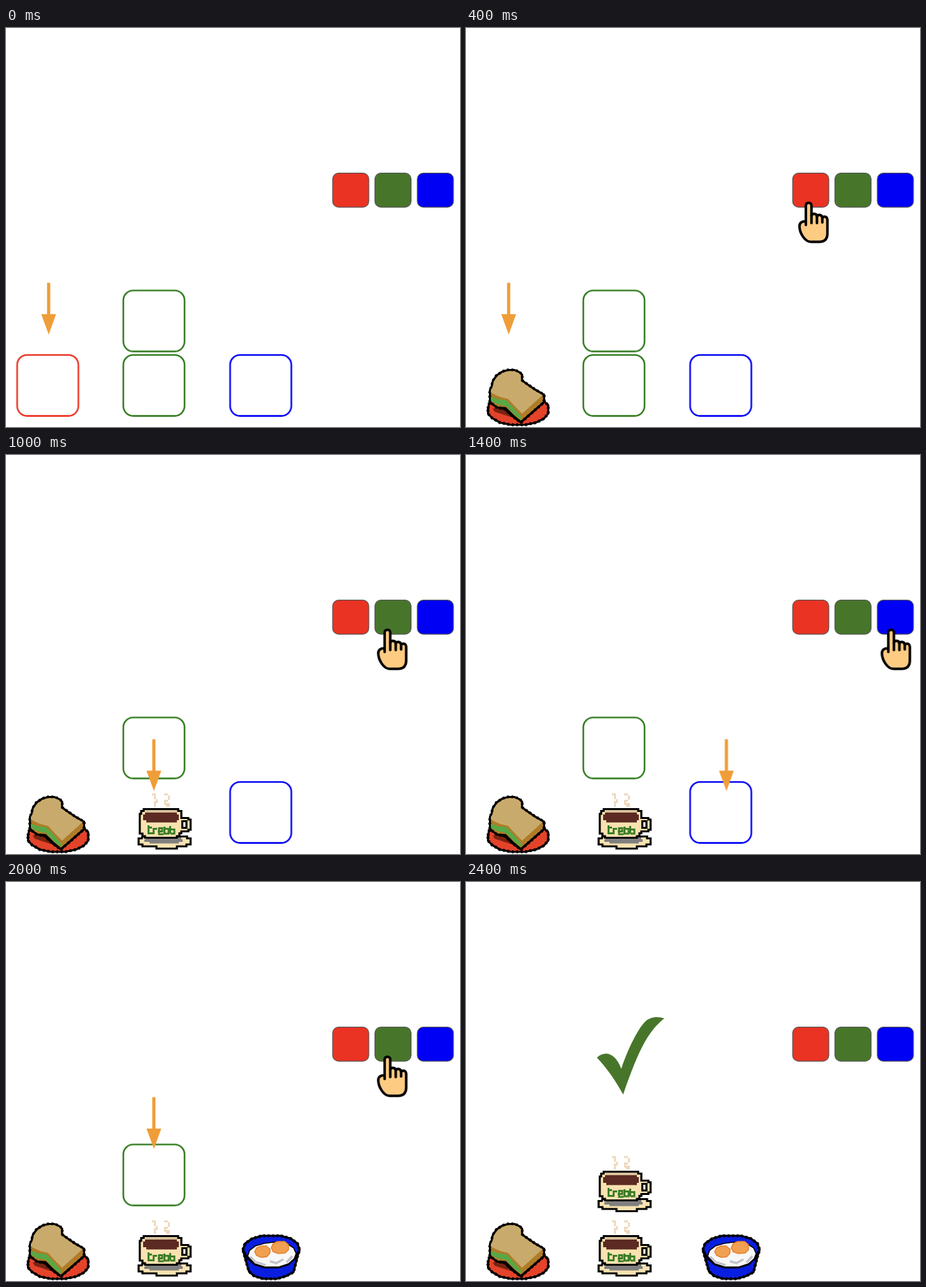
An HTML page for the animation above (2600 ms loop, 712 by 626 pixels).

```html
<!DOCTYPE html>
<html lang="en">
<head>
<meta charset="utf-8">
<title>Breakfast order</title>
<style>
  html, body { margin: 0; width: 100%; height: 100%; overflow: hidden; background: #fff; }
  svg { display: block; width: 100%; height: 100%; }

  .slot { fill: none; stroke-width: 2.6; }
  .red { stroke: #ea3323; }
  .green { stroke: #357d22; }
  .blue { stroke: #0000f5; }
  .key { stroke: #555; stroke-width: 1.2; }
  .ink { stroke: #000; stroke-width: 3.2; stroke-linejoin: miter; }
  .rough { fill: none; stroke: #000; stroke-width: 4.6; stroke-dasharray: 3 4; }

  /* 13 beats of 200 ms */
  .anim { animation: 2600ms step-end infinite; }
  .old { --a: 1; --b: 0; }
  .new { --a: 0; --b: 1; }
  .b2 { animation-name: beat2; }
  .b5 { animation-name: beat5; }
  .b8 { animation-name: beat8; }
  .b11 { animation-name: beat11; }
  .b12 { animation-name: beat12; }
  .arrow { animation-name: arrow; }
  .hand { animation-name: hand; }

  @keyframes beat2 { 0% { opacity: var(--a); } 15.384%, 100% { opacity: var(--b); } }
  @keyframes beat5 { 0% { opacity: var(--a); } 38.461%, 100% { opacity: var(--b); } }
  @keyframes beat8 { 0% { opacity: var(--a); } 61.538%, 100% { opacity: var(--b); } }
  @keyframes beat11 { 0% { opacity: var(--a); } 84.615%, 100% { opacity: var(--b); } }
  @keyframes beat12 { 0% { opacity: var(--a); } 92.307%, 100% { opacity: var(--b); } }

  @keyframes arrow {
    0% { transform: translate(0, 0); opacity: 1; }
    23.076% { transform: translate(165px, 46.2px); opacity: 1; }
    46.153% { transform: translate(341.5px, 46.2px); opacity: 1; }
    69.23% { transform: translate(165px, -62.2px); opacity: 1; }
    92.307%, 100% { transform: translate(165px, -62.2px); opacity: 0; }
  }
  @keyframes hand {
    0% { transform: translate(0, 0); opacity: 0; }
    7.692% { transform: translate(0, 0); opacity: 1; }
    23.076% { transform: translate(0, 0); opacity: 0; }
    30.769% { transform: translate(60.8px, 0); opacity: 1; }
    46.153% { transform: translate(60.8px, 0); opacity: 0; }
    53.846% { transform: translate(129.3px, 0); opacity: 1; }
    69.23% { transform: translate(129.3px, 0); opacity: 0; }
    76.923% { transform: translate(60.8px, 0); opacity: 1; }
    92.307%, 100% { transform: translate(60.8px, 0); opacity: 0; }
  }
</style>
</head>
<body>
<svg viewBox="0 0 712 626" preserveAspectRatio="none">
  <defs>
    <rect id="slot" width="96" height="95.6" rx="15.5"/>
    <rect id="key" y="227.6" width="56.8" height="53.6" rx="9.5"/>

    <g id="cup">
      <path fill="#ecd9bd" d="M229 531H235V540H238V546H235V552H232V543H235V540H232V534H229ZM248 531H254V534H257V541H254V544H251V546H257V552H251V549H248V541H254V534H248Z"/>
      <path class="ink" fill="#fae2b0" d="M213 601.5H208V611H214V614H236V617.5H268V614H283V611H289.5V601.5H284V598.5H214Z"/>
      <path fill="#808080" d="M219 600H275V603H277V607H271V609.5H225V607H217V603H219Z"/>
      <path class="ink" fill="#fae2b0" d="M216 555.5H270V558.5H275V569.5H286V572H289.5V588H286V590.5H275V593.5H272V598H268V600.5H218V598H214V594H209.8V563H212V558.5H216Z"/>
      <path fill="#d8c19a" d="M219 557H268V561H219Z"/>
      <path fill="#5c2a22" d="M218 561H268V564H271V573H268V576.5H220V573H215V564H218Z"/>
      <path class="ink" fill="#fff" stroke-width="3" d="M276.5 574.5H283V585H276.5Z"/>
      <path fill="none" stroke="#3c7d27" stroke-width="3" d="M223.5 581V595M222 584.5H229M223 593.5H233M231.5 595V586.5H237M238 590.5H245V585.5H240V595H247M248.5 583V594H255V586.5H249M257.5 582V594M259 587.5H264V594H258"/>
    </g>

    <path id="plate" d="M34.5 597L36 590L43 583L56 577H108L121 584L129 592V605L122 613L110 619L93 622.5H70L53 619L41 612L34.5 605Z"/>
    <path id="bread" d="M37.5 587V568L40 563L42 554L48 545L57 539L66 536.5L76 536.5L84 540L88 544V553L95 558L108 567L122.5 575.5V587L86 619L74 610L61 598L48 595Z"/>
    <path id="bowl" d="M371.5 577L375 567L386 559.5L401 555H431L447 559.5L457 567L460.5 577L457 588L451 612L440 618L425 622.5H403L389 618L381 611L375 590Z"/>
  </defs>

  <g class="key">
    <use href="#key" x="512.2" fill="#ea3323"/>
    <use href="#key" x="578.5" fill="#47762b"/>
    <use href="#key" x="645" fill="#0000f5"/>
  </g>

  <use href="#slot" x="17.5" y="513" class="slot red anim old b2"/>
  <use href="#slot" x="184" y="411.8" class="slot green anim old b11"/>
  <use href="#slot" x="184" y="513" class="slot green anim old b5"/>
  <use href="#slot" x="351.5" y="513" class="slot blue anim old b8"/>

  <g class="anim new b2">
    <use href="#plate" class="ink" fill="#e4432a"/>
    <use href="#plate" class="rough"/>
    <path fill="#7a2312" d="M42 597L53 595L64 600L76 612L60 607L45 602Z"/>
    <use href="#bread" class="ink" fill="#b07c28"/>
    <use href="#bread" class="rough"/>
    <path fill="#c8ab6c" d="M39 572V568L42 563L44 554L49 547L58 541L66 538.5H76L83 541.5L86 545V554L94 560L107 569L120 576L88 605L78 595L66 582L54 579L47 576Z"/>
    <path fill="#57a846" d="M39 578L48 582L63 584L75 596L86 609V615L76 607L63 593L49 590L39 585Z"/>
    <path fill="none" stroke="#000" stroke-width="2.6" d="M38 587L48 595L62 596L74 608L86 618L122 587"/>
  </g>

  <use href="#cup" class="anim new b5"/>
  <use href="#cup" y="-101" class="anim new b11"/>

  <g class="anim new b8">
    <use href="#bowl" class="ink" fill="#0a1ee0"/>
    <use href="#bowl" class="rough"/>
    <path fill="none" stroke="#000" stroke-width="2.6" d="M374 580L379 591L390 600L405 605H427L443 600L453 591L458 580"/>
    <path fill="#f8f8f8" stroke="#000" stroke-width="1.6" d="M379 587L382 578L391 571L405 567L420 565L440 567L451 574L455 583L452 591L443 599L428 604H406L390 599Z"/>
    <path fill="none" stroke="#c2c2ca" stroke-width="3.4" d="M383 588L391 596L407 601M414 595L424 598L435 592M440 597L449 587"/>
    <g fill="#f0a050" stroke="#e58030" stroke-width="1.6">
      <path d="M390 580L393 574L400 571H408L414 576V582L409 588L400 589L393 586Z"/>
      <path d="M416 574L419 567L426 564H437L443 569V577L438 582L427 583L419 580Z"/>
    </g>
  </g>

  <path class="anim new b12" fill="#47762b" d="M205.3 275.5C218 264 234 268 243.5 293C253 264 269 231 281 219C289 211 301 210.5 311 214C286 234 271 262 246.5 333.5C236 314 222 293 205.3 275.5Z"/>

  <path class="anim arrow" fill="#ef9d38" d="M64.4 399.8H69.4V449H78.5L67 481L55.3 449H64.4Z"/>

  <g class="anim hand" stroke="#000" stroke-width="4" stroke-linecap="round" stroke-linejoin="round">
    <path fill="#fecb82" d="M533 309V279Q533 274.3 537.4 274.3T541.8 279V295Q542 291.5 546 291.5T550.4 296Q551 293.3 554.5 293.3T558.8 298Q559.5 296 562.8 296T566.8 301V322Q566.8 335.5 554 335.5H541C531 335.5 523 321 523 311Q523 303 533 303.2"/>
    <path fill="none" d="M541.8 294V306M550.4 296V306M558.8 298V305"/>
  </g>
</svg>
</body>
</html>
```
